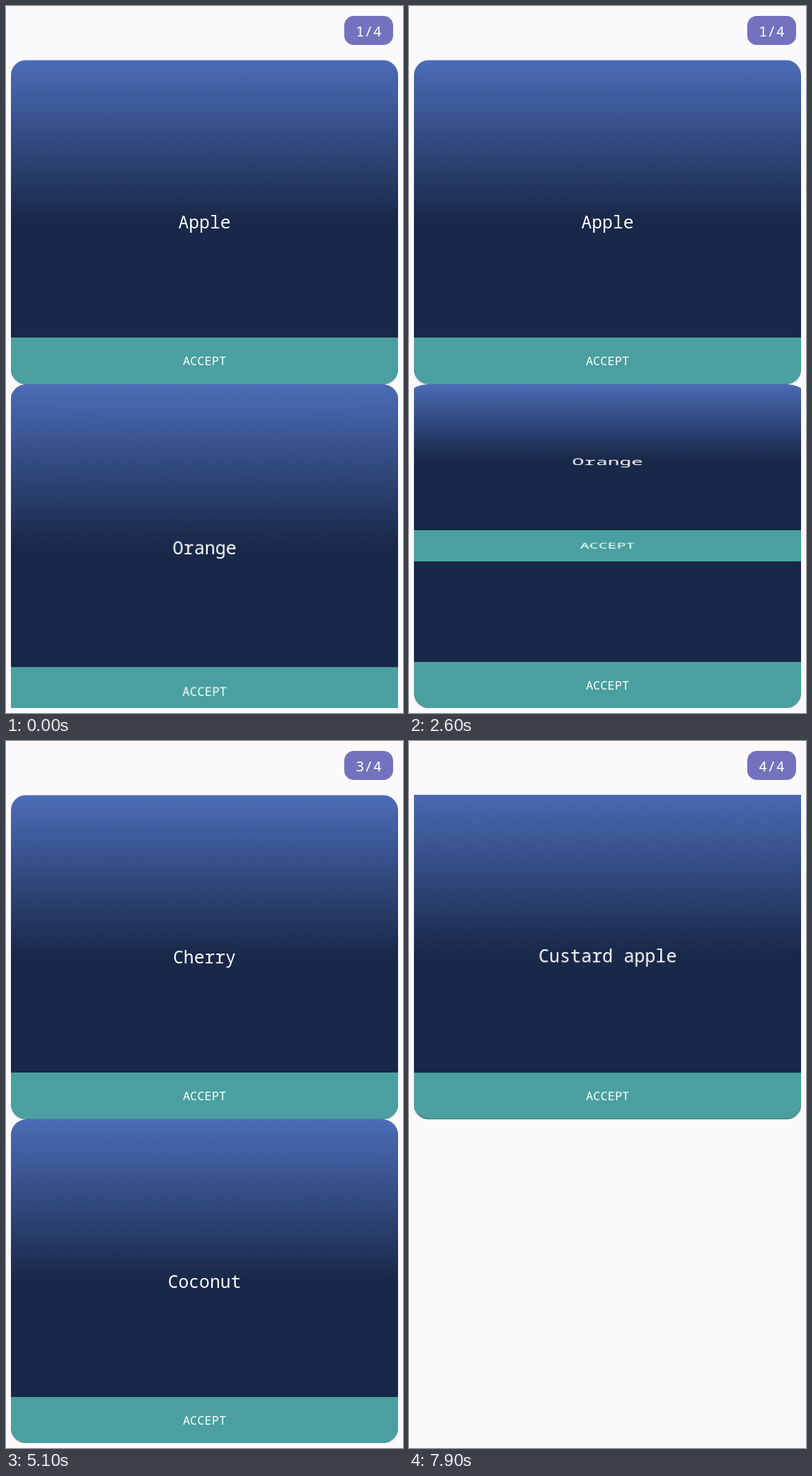
These frames come from a looping animation (561 px wide and 998 px high, 8000 ms). An HTML page:

```html
<!DOCTYPE html>
<html lang="en">
<head>
<meta charset="utf-8">
<title>Flip pages</title>
<style>
  html, body { margin: 0; width: 100%; height: 100%; overflow: hidden; background: #fbf9fb; }
  body { position: relative; color: #fff; font: 24.7px "Noto Sans Mono", monospace; text-align: center; }
  #badge {
    position: absolute; left: 478px; top: 14px; width: 69px; height: 41px;
    border-radius: 13.6px; background: #7472be; font-size: 20.5px; line-height: 42px;
  }
  #view { position: absolute; left: 6.8px; top: 76.4px; width: 547.4px; height: 914.8px; overflow: hidden; }
  .card {
    position: absolute; top: 0; width: 100%; height: 50%; border-radius: 22px; overflow: hidden;
    background: linear-gradient(#4b6cb7, #182848 50%); line-height: 457.4px;
    box-shadow: 0 1px 3px #0004; clip-path: inset(0); /* shadow only in the corners */
  }
  .card.low { top: 50%; }
  .card::after {
    content: "ACCEPT"; position: absolute; left: 0; bottom: 0; width: 100%; height: 65.4px;
    background: #4aa0a0; font-size: 17px; line-height: 65.4px;
  }
</style>
</head>
<body>
<div id="badge"></div>
<div id="view">
  <div class="card" id="upper"></div>
  <div class="card low" id="lower"></div>
  <div class="card" id="flap"></div>
</div>
<script>
const LOOP = 8000, STEP = 100, DEPTH = 1830;
const SLOP = 3; // degrees within which a page lies flat
const PEEK = 1200, peekHeights = [97, 45];
const pages = [["Apple", "Orange"], ["Mango", "Banana"], ["Cherry", "Coconut"], ["Custard apple"]];
const flips = [
  { start: 2321, length: 680, way: 1 },
  { start: 4059, length: 960, way: 1 },
  { start: 5805, length: 960, way: 1 },
  { start: 7780, length: 960, way: -1 },
];

const [badge, upper, lower, flap] =
  ["badge", "upper", "lower", "flap"].map(id => document.getElementById(id));

// Half a turn, eased in and out
function flipAngle(t, { start, length, way }) {
  const x = Math.min(1, Math.max(0, (t - start) / length));
  return way * 90 * (1 - Math.cos(Math.PI * x));
}

// The first page is lifted and lowered before it is turned
function peekAngle(t) {
  const height = peekHeights[Math.floor(t / PEEK)];
  return height ? 6.5 + height * Math.sin(Math.PI * t / PEEK) ** 2 : 0;
}

function turnAt(t) {
  const flipped = flips.reduce((sum, flip) => sum + flipAngle(t, flip), 0);
  const turn = Math.max(peekAngle(t), flipped);
  const flat = Math.round(turn / 180) * 180;
  return Math.abs(turn - flat) < SLOP ? flat : turn;
}

function show(card, name) {
  card.style.display = name ? "" : "none";
  card.textContent = name || "";
}

function draw() {
  const t = Math.floor(performance.now() % LOOP / STEP) * STEP;
  const turn = turnAt(t), page = Math.floor(turn / 180), angle = turn % 180;
  const next = angle ? page + 1 : page;
  const past = angle > 90;

  show(upper, pages[page][0]);
  show(lower, pages[next][1]);
  show(flap, angle && (past ? pages[next][0] : pages[page][1]));
  flap.classList.toggle("low", !past);
  flap.style.transformOrigin = past ? "50% 100%" : "50% 0";
  flap.style.transform = `perspective(${DEPTH}px) rotateX(${past ? angle - 180 : angle}deg)`;

  const closing = t > flips[3].start; // the count waits until the page is back
  badge.textContent = `${closing ? pages.length : page + 1}/${pages.length}`;
  requestAnimationFrame(draw);
}
draw();
</script>
</body>
</html>
```
